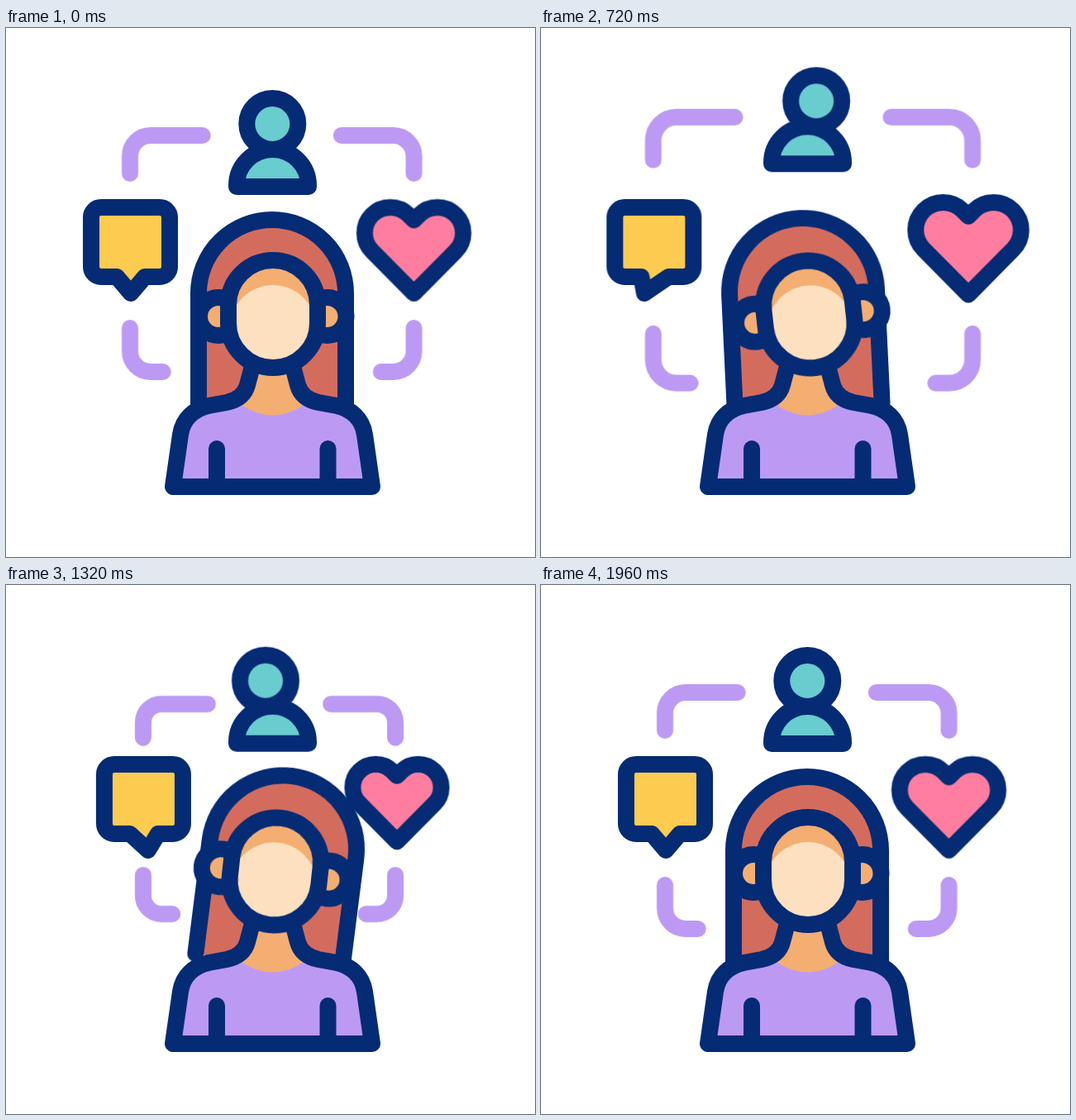
An HTML page for the animation above (2 s loop, 640 px wide and 640 px high).

```html
<!DOCTYPE html>
<html lang="en">
<head>
<meta charset="utf-8">
<title>Social profile</title>
<style>
  html, body { margin: 0; width: 100%; height: 100%; overflow: hidden; background: #fff; }
  svg { display: block; width: 640px; height: 640px; }

  .line {
    stroke: #052b75; stroke-width: 20;
    stroke-linecap: round; stroke-linejoin: round;
    vector-effect: non-scaling-stroke;
  }
  .lilac-line { stroke: #bc9af4; }
  .none { fill: none; }
  .lilac { fill: #bc9af4; }
  .yellow { fill: #fdcb50; }
  .pink { fill: #ff7d9f; }
  .teal { fill: #69cccf; }
  .hair-fill { fill: #d46c5e; }
  .skin { fill: #f5ae71; }
  .light { fill: #fde0bf; }

  /* Each moving part swings from rest to --a, across to --b, and back. */
  .orbit, .turn, .tail {
    animation: orbit 2s cubic-bezier(.333, 0, .667, 1) infinite;
  }
  .turn { animation-name: turn; }
  .tail { animation-name: tail; }

  @keyframes orbit {
    0%, 4% { transform: none; }
    34% { transform: var(--a); }
    68% { transform: var(--b); }
    97%, 100% { transform: none; }
  }
  @keyframes turn {
    0% { transform: none; }
    28% { transform: var(--a); }
    64% { transform: var(--b); }
    98%, 100% { transform: none; }
  }
  @keyframes tail {
    0%, 4%, 97%, 100% { d: path("M115 217H186A12 12 0 0 1 198 229V289A12 12 0 0 1 186 301H168L151 321L134 301H115A12 12 0 0 1 103 289V229A12 12 0 0 1 115 217Z"); }
    34% { d: path("M115 217H186A12 12 0 0 1 198 229V289A12 12 0 0 1 186 301H168L138.5 321L135 301H115A12 12 0 0 1 103 289V229A12 12 0 0 1 115 217Z"); }
    68% { d: path("M115 217H186A12 12 0 0 1 198 229V289A12 12 0 0 1 186 301H168L156 321L134 301H115A12 12 0 0 1 103 289V229A12 12 0 0 1 115 217Z"); }
  }

  .brackets { --a: translate(7.3px, -4.3px) scale(1.127); --b: translate(-3.4px, -2px) scale(.886); }
  .bubble { --a: translate(-14px, 0); --b: translate(16.2px, 0); }
  .heart { --a: translate(24px, -2.2px) scale(1.072); --b: translate(-21px, -5.5px) scale(.897); }
  .person { --a: translate(0, -28px); --b: translate(0, 0); }
  .person-head { --a: translate(11px, 0); --b: translate(-8.5px, 0); }
  .hair { --a: translate(0, -2px) rotate(-4.2deg); --b: translate(0, -2.4px) rotate(7.3deg); }
  .head { --a: translate(1.5px, .5px) rotate(-8.2deg); --b: translate(2.5px, .5px) rotate(6.3deg); }
</style>
</head>
<body>
<svg viewBox="0 0 640 640">
  <defs>
    <clipPath id="face"><rect x="-54" y="-68" width="108" height="130" rx="54"/></clipPath>
    <g id="side">
      <path d="M-171.75-97V-118A25 25 0 0 1-146.75-143H-84"/>
      <path d="M-171.75 90V118A25 25 0 0 0-146.75 143H-132"/>
    </g>
  </defs>

  <g transform="translate(321.75 273)">
    <g class="orbit brackets">
      <path class="line lilac-line none" d="M-171.75-97V-118A25 25 0 0 1-146.75-143H-84M171.75-97V-118A25 25 0 0 0 146.75-143H84M-171.75 90V118A25 25 0 0 0-146.75 143H-132M171.75 90V118A25 25 0 0 1 146.75 143H132"/>
    </g>
  </g>

  <g class="orbit person">
    <path class="line teal" d="M279 192V190.5A43.5 43.5 0 0 1 366 190.5V192Z"/>
    <g class="orbit person-head"><circle class="line teal" cx="322.3" cy="116" r="31"/></g>
  </g>

  <g class="orbit bubble">
    <path class="line yellow tail" d="M115 217H186A12 12 0 0 1 198 229V289A12 12 0 0 1 186 301H168L151 321L134 301H115A12 12 0 0 1 103 289V229A12 12 0 0 1 115 217Z"/>
  </g>

  <g transform="translate(322 425)">
    <g class="turn hair">
      <path class="line hair-fill" d="M-89 35V-104A89 89 0 0 1 89-104V35"/>
    </g>
  </g>

  <g transform="translate(493.5 269.5)">
    <g class="orbit heart">
      <path class="line pink" d="M0 51.5L-50.5 .5A31 31 0 0 1-6.5-43.5L0-37L6.5-43.5A31 31 0 0 1 50.5 .5Z"/>
    </g>
  </g>

  <g transform="translate(323 349)">
    <g class="turn head">
      <circle class="line skin" cx="-66" r="23"/>
      <circle class="line skin" cx="65.5" r="23"/>
    </g>
  </g>

  <path class="lilac" d="M202 555L211 492C214 472 228 461 245 457L267 453C281 450 289 443 292 432L297 413H348L353 432C356 443 364 450 378 453L400 457C417 461 431 472 434 492L443 555Z"/>
  <path class="skin" d="M297 405L292 432C289 443 284 449 278 451Q322.5 486 367 451C361 449 356 443 353 432L348 405Z"/>
  <path class="line none" d="M297 413L292 432C289 443 281 450 267 453L245 457C228 461 214 472 211 492L202 555H443L434 492C431 472 417 461 400 457L378 453C364 450 356 443 353 432L348 413"/>
  <path class="line none" d="M255 509V555M389.5 509V555"/>

  <g transform="translate(323 349)">
    <g class="turn head">
      <rect class="skin" x="-54" y="-68" width="108" height="130" rx="54"/>
      <path class="light" clip-path="url(#face)" d="M-52 14A52 52 0 0 1 52 14V70H-52Z"/>
      <rect class="line none" x="-54" y="-68" width="108" height="130" rx="54"/>
    </g>
  </g>
</svg>
</body>
</html>
```
